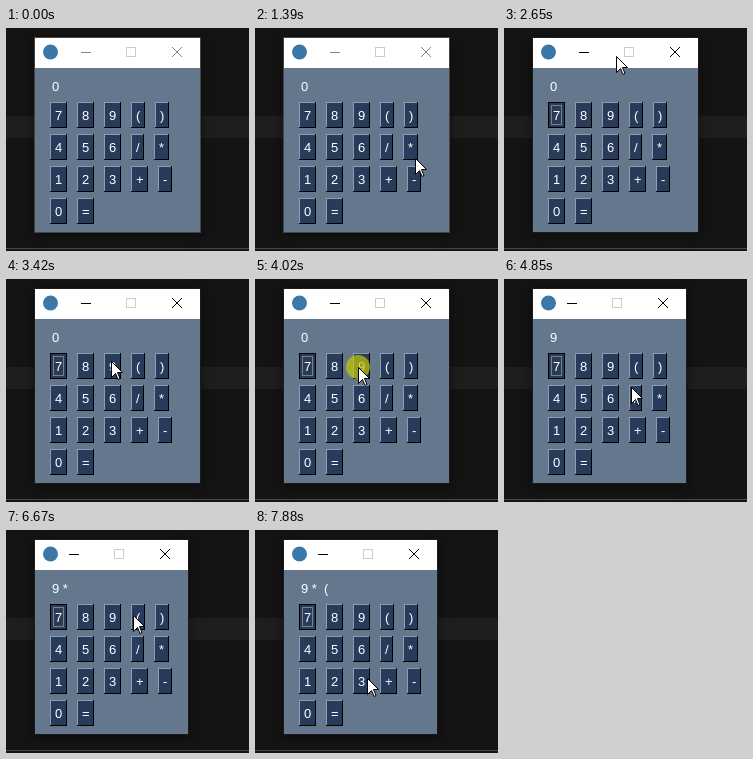
An HTML page with a canvas for the animation above (8 s loop, 243 px wide and 223 px high).

```html
<!DOCTYPE html>
<html lang="en">
<head>
<meta charset="utf-8">
<title>Calculator</title>
<style>
  html, body { margin: 0; width: 100%; height: 100%; overflow: hidden; background: #141414; }
  canvas { display: block; }
</style>
</head>
<body>
<canvas id="stage" width="243" height="223"></canvas>
<script>
const ctx = document.getElementById('stage').getContext('2d');
const LOOP = 8000;
const FONT = '13px "Liberation Sans", Arial, sans-serif';

// Pointer steps: start time, x, y, kind. The pointer jumps between them.
const POINTER = [
  [0, 0, 0, 'none'],
  [390, 201, 207, 'beam'], [570, 210, 147, 'beam'], [990, 213, 147, 'beam'],
  [1390, 160, 130, 'arrow'], [1790, 69, 22, 'click'],
  [2200, 69, 22, 'arrow'], [2420, 92, 25, 'arrow'], [2650, 112, 28, 'arrow'],
  [2810, 113, 40, 'arrow'], [3020, 111, 57, 'arrow'], [3220, 108, 73, 'arrow'],
  [3420, 105, 82, 'arrow'], [3620, 103, 88, 'arrow'],
  [4020, 103, 88, 'click'], [4240, 103, 88, 'arrow'],
  [4640, 114, 99, 'arrow'], [4850, 127, 108, 'arrow'], [5030, 145, 113, 'arrow'],
  [5250, 157, 115, 'arrow'], [5450, 157, 115, 'click'], [5670, 157, 115, 'arrow'],
  [6270, 148, 106, 'arrow'], [6470, 135, 93, 'arrow'], [6670, 127, 85, 'arrow'],
  [7490, 123, 104, 'arrow'], [7690, 116, 132, 'arrow'], [7880, 112, 148, 'arrow']
];
const DISPLAY = [[0, '0'], [4240, '9'], [5670, '9 *'], [7070, '9 *  (']];
const ROWS = ['789()', '456/*', '123+-', '0='];
const FOCUS_TIME = 2200, SHRINK_TIME = 4240;

const stepAt = (steps, t) => steps.filter(s => s[0] <= t).pop();

function rect(x, y, w, h, color) {
  ctx.fillStyle = color;
  ctx.fillRect(x, y, w, h);
}

function frame(x, y, w, h, color, dash = []) {
  ctx.strokeStyle = color;
  ctx.lineWidth = 1;
  ctx.setLineDash(dash);
  ctx.strokeRect(x + .5, y + .5, w - 1, h - 1);
  ctx.setLineDash([]);
}

function text(value, x, y) {
  ctx.font = FONT;
  ctx.fillStyle = '#fff';
  ctx.fillText(value, x, y);
}

function circle(x, y, r, color) {
  ctx.fillStyle = color;
  ctx.beginPath();
  ctx.arc(x, y, r, 0, Math.PI * 2);
  ctx.fill();
}

function drawBackdrop() {
  rect(0, 0, 243, 223, '#141414');
  rect(0, 88, 243, 22, '#1e1e1e');
  rect(0, 220, 243, 1, '#484848');
}

function drawTitleBar(right, active) {
  rect(29, 10, right - 29, 30, '#fff');
  circle(44.5, 24, 7.5, '#3b78a8');
  const color = active ? '#000' : '#858585';
  rect(right - 119, 24, 10, 1, color);
  frame(right - 74, 19, 10, 10, '#ccc');
  ctx.strokeStyle = color;
  ctx.beginPath();
  ctx.moveTo(right - 28, 19);
  ctx.lineTo(right - 18, 29);
  ctx.moveTo(right - 18, 19);
  ctx.lineTo(right - 28, 29);
  ctx.stroke();
}

function drawButton(label, x, y, width, focused) {
  rect(x, y, width, 26, '#000');
  rect(x, y, width - 1, 25, focused ? '#000' : '#8d9bb0');
  rect(x + 1, y + 1, width - 2, 24, '#283b5b');
  if (focused) frame(x + 3, y + 3, width - 6, 20, '#d7c4a4', [1, 1]);
  text(label, x + 5, y + 18);
}

function drawKeys(active) {
  ctx.font = FONT;
  ROWS.forEach((row, i) => {
    let x = 44;
    for (const label of row) {
      const width = Math.ceil(ctx.measureText(label).width) + 9;
      drawButton(label, x, 74 + 32 * i, width, active && label === '7');
      x += width + 10;
    }
  });
}

function drawWindow(t) {
  const active = t >= FOCUS_TIME;
  const right = t >= SHRINK_TIME ? 182 : 194;
  ctx.shadowColor = 'rgba(0,0,0,.5)';
  ctx.shadowBlur = 10;
  ctx.shadowOffsetY = 2;
  rect(28, 9, right - 27, 196, active ? '#1b1b1b' : '#444');
  ctx.shadowColor = 'transparent';
  rect(29, 10, right - 29, 194, '#64778d');
  drawTitleBar(right, active);
  text(stepAt(DISPLAY, t)[1], 46, 63);
  drawKeys(active);
}

function drawPointer([, x, y, kind]) {
  if (kind === 'none') return;
  if (kind === 'beam') {
    rect(x, y, 3, 1, '#ddd');
    rect(x + 4, y, 3, 1, '#ddd');
    rect(x + 3, y + 1, 1, 14, '#ddd');
    rect(x, y + 15, 3, 1, '#ddd');
    rect(x + 4, y + 15, 3, 1, '#ddd');
    return;
  }
  if (kind === 'click') circle(x, y, 12, 'rgba(200,200,0,.7)');
  const arrow = new Path2D('M.5 .5V16.5L4.5 12.5L7 18.5L9 17.5L6.5 11.5H11.5Z');
  ctx.save();
  ctx.translate(x, y);
  ctx.fillStyle = '#fff';
  ctx.strokeStyle = '#000';
  ctx.fill(arrow);
  ctx.stroke(arrow);
  ctx.restore();
}

function draw(now) {
  const t = now % LOOP;
  drawBackdrop();
  drawWindow(t);
  drawPointer(stepAt(POINTER, t));
}

const start = performance.now();
function tick() {
  draw(performance.now() - start);
  requestAnimationFrame(tick);
}
tick();
</script>
</body>
</html>
```
